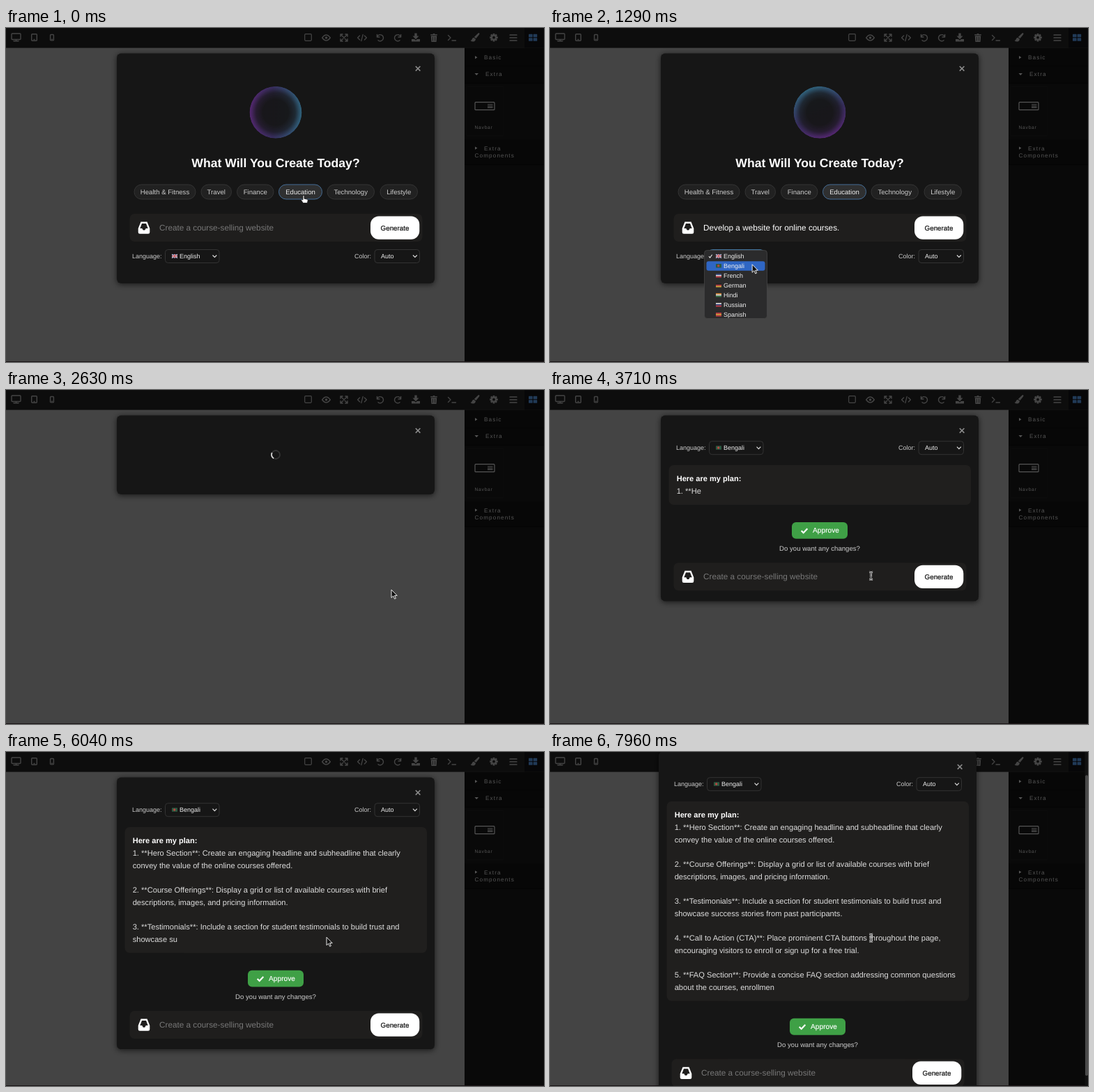
These frames come from a looping animation (772x480 px, 8000 ms). An HTML page:

```html
<!DOCTYPE html>
<html lang="en">
<head>
<meta charset="utf-8">
<title>Website builder</title>
<style>
html, body { margin: 0; width: 100%; height: 100%; overflow: hidden; background: #444; }
svg { display: block; width: 772px; height: 480px; }
text { font-family: "Liberation Sans", Arial, sans-serif; text-rendering: geometricPrecision; white-space: pre; }
.mono { font-family: "DejaVu Sans Mono", monospace; font-size: 8.2px; letter-spacing: 1.1px; fill: #555; }
.mid { text-anchor: middle; }
.icon { fill: none; stroke: #454545; stroke-width: 1.4; stroke-linecap: round; stroke-linejoin: round; }
.solid { fill: #454545; stroke: none; }
</style>
</head>
<body>
<svg id="stage" viewBox="0 0 772 480" xmlns="http://www.w3.org/2000/svg"></svg>
<script>
const LOOP = 8000, LINE = 17.68;
const T = { prompt: 220, open: 1000, pick: 1550, send: 2330, plan: 3630 };
const PROMPT = 'Develop a website for online courses.';
const PLAN = [
  '1. **Hero Section**: Create an engaging headline and subheadline that clearly',
  'convey the value of the online courses offered.',
  '',
  '2. **Course Offerings**: Display a grid or list of available courses with brief',
  'descriptions, images, and pricing information.',
  '',
  '3. **Testimonials**: Include a section for student testimonials to build trust and',
  'showcase success stories from past participants.',
  '',
  '4. **Call to Action (CTA)**: Place prominent CTA buttons throughout the page,',
  'encouraging visitors to enroll or sign up for a free trial.',
  '',
  '5. **FAQ Section**: Provide a concise FAQ section addressing common questions',
  'about the courses, enrollment, '
];
let sum = 0;
const starts = PLAN.map(s => { const at = sum; sum += s.length + 1; return at; });

const rect = (x, y, w, h, r, fill, more = '') =>
  `<rect x="${x}" y="${y}" width="${w}" height="${h}" rx="${r}" fill="${fill}" ${more}/>`;
const text = (x, y, size, fill, s, more = '') =>
  `<text x="${x}" y="${y}" font-size="${size}" fill="${fill}" ${more}>${s}</text>`;
const at = (x, y, s) => `<g transform="translate(${x} ${y})">${s}</g>`;
const path = (d, more = '') => `<path d="${d}" ${more}/>`;

function toolbar() {
  const solid = 'class="solid"';
  const gear = [0, 45, 90, 135].map(a =>
    `<rect x="-1.4" y="-5.8" width="2.8" height="11.6" class="solid" transform="rotate(${a})"/>`).join('');
  const undo = path('M-4.6-4.5V-1H-1M-4.4-1.4A4.6 4.6 0 1 1-3 3.8');
  return '<g class="icon">' +
    at(14.5, 13, rect(-6.5, -5, 13, 8.5, 1, 'none') + path('M-3.5 5.8H3.5M0 4V5.5')) +
    at(40.5, 13.5, rect(-3.8, -4.8, 7.6, 9.6, 1, 'none') + path('M-.4 3H.4')) +
    at(66, 13.7, rect(-2.4, -4.2, 4.8, 8.4, 1, 'none') + path('M-.3 2.6H.3')) +
    at(433.5, 13.5, rect(-4.8, -4.8, 9.6, 9.6, 1.2, 'none', 'stroke-width="1.2"')) +
    at(459.5, 14, path('M-5.8 0Q0-8 5.8 0Q0 8-5.8 0Z') + `<circle r="1.8" class="solid"/>`) +
    at(485, 14, path('M-4.5-4.5L4.5 4.5M4.5-4.5L-4.5 4.5M-5-1.8V-5H-1.8M1.8-5H5V-1.8M5 1.8V5H1.8M-1.8 5H-5V1.8')) +
    at(511, 14, path('M-3.4-3L-6.4 0L-3.4 3M3.4-3L6.4 0L3.4 3M1.2-4.6L-1.2 4.6', 'stroke-width="1.3"')) +
    at(537, 14, undo) +
    at(562, 14, `<g transform="scale(-1 1)">${undo}</g>`) +
    at(588, 13.5, path('M-1.7-6H1.7V-2H4.6L0 2.7L-4.6-2H-1.7ZM-6 2.5H-2L0 4.3L2 2.5H6V6H-6Z', solid)) +
    at(614, 14, path('M-4.8-5H-1.6L-1-6H1L1.6-5H4.8V-3.6H-4.8ZM-4.2-2.8H4.2L3.6 6H-3.6Z', solid) +
      path('M-1.6-.8V4M1.6-.8V4', 'stroke="#111" stroke-width=".8"')) +
    at(640, 14, path('M-5.5-3.5L-2 0L-5.5 3.5M0 4H5.5', 'stroke-width="1.3"')) +
    at(673, 13.5, path('M6-6.3Q7-5.5 6-4L1.5 1.6L-1.2-.5L4.5-6Q5.3-6.7 6-6.3ZM-1.8.2L1 2.4Q.6 6-3.5 6Q-6 6-6.4 4.2Q-4.6 4.6-4.3 2.6Q-3.8.4-1.8.2Z', solid)) +
    at(700, 13.7, gear + '<circle r="3" stroke-width="2.2" fill="#0d0d0d"/>') +
    at(728, 14, path('M-4.8-4H4.8M-4.8 0H4.8M-4.8 4H4.8', 'stroke-width="1.7"')) +
    '</g>' +
    at(756, 13.8, rect(-12, -13.8, 28, 28.4, 0, '#070708') + [[-6, -5], [.6, -5], [-6, .5], [.6, .5]]
      .map(p => rect(p[0], p[1], 5.6, 4.5, .6, '#213a57')).join(''));
}

function sidebar() {
  const line = (y) => rect(658, y, 114, 1, 0, '#040404');
  return rect(658, 28.6, 114, 451.4, 0, '#090909') +
    rect(658, 28.6, 114, 50.4, 0, '#070707') + line(54) + line(79) +
    rect(661, 84, 53, 71, 1, '#090909', 'stroke="#0c0c0c"') +
    rect(658, 160, 114, 36, 0, '#070707') + line(196) +
    path('M673 40L676.4 42.2L673 44.4ZM672.5 65L678 65L675.2 68ZM673 170.4L676.4 172.6L673 174.8Z', 'fill="#555"') +
    '<g class="mono">' +
    '<text x="686" y="45">Basic</text><text x="688" y="69.2">Extra</text>' +
    '<text x="686" y="175.6">Extra</text><text x="672.5" y="185.6">Components</text>' +
    '<text x="672.5" y="145.4" style="font-size:6.7px;letter-spacing:.75px">Navbar</text></g>' +
    rect(673, 106.7, 28, 11, 1, 'none', 'stroke="#555" stroke-width="1.2"') +
    path('M691 110H698.5M691 112.2H698.5M691 114.4H698.5', 'stroke="#555" stroke-width="1.1"');
}

const flagUK = rect(0, 0, 8, 5.4, .5, '#34457f') +
  path('M0 0L8 5.4M8 0L0 5.4', 'stroke="#d8cfd2" stroke-width="1.1"') +
  path('M4 0V5.4M0 2.7H8', 'stroke="#e4dcdc" stroke-width="1.9"') +
  path('M4 0V5.4M0 2.7H8', 'stroke="#c23a44" stroke-width="1.1"');
const flagBD = rect(0, 0, 8, 5.4, .5, '#2c5a41') + '<circle cx="3.7" cy="2.7" r="1.7" fill="#b8453f"/>';
const stripes = (a, b, c) => rect(0, 0, 8, 1.8, 0, a) + rect(0, 1.8, 8, 1.8, 0, b) + rect(0, 3.6, 8, 1.8, 0, c);

function select(x, w, id) {
  return rect(x, -9.5, w, 19, 4, '#161616', `id="${id}" stroke="#333"`) +
    path(`M${x + w - 9.5}-1.5l2.9 3l2.9-3`, 'fill="none" stroke="#ddd" stroke-width="1.2"');
}

function options() {
  return '<g id="options">' + text(181, 3.2, 9, '#ccc', 'Language:') + select(228.5, 77.5, 'langBox') +
    `<g id="en">${at(238, -2.9, flagUK)}${text(249, 3.2, 9, '#eee', 'English')}</g>` +
    `<g id="bn">${at(238, -2.9, flagBD)}${text(249, 3.2, 9, '#eee', 'Bengali')}</g>` +
    text(500, 3.2, 9, '#ccc', 'Color:') + select(529, 64.5, 'colorBox') + text(538, 3.2, 9, '#eee', 'Auto') + '</g>';
}

function inputBar() {
  return '<g id="bar">' + rect(177.5, -20, 420, 40, 7, '#1f1e1d', 'id="barBox"') +
    path('M193.5-8.5H202.5L206.3 1V6.5Q206.3 8.8 204 8.8H192Q189.7 8.8 189.7 6.5V1ZM195-6L192.3 1H195.3L196.7 3.6H199.3L200.7 1H203.7L201-6Z',
      'fill="#fff" fill-rule="evenodd"') +
    text(220, 4.1, 11.75, '#777', '', 'id="prompt"') +
    '<g id="button">' + rect(523, -16.6, 70.3, 33.4, 12, '#fff') +
    text(558, 3.5, 9.8, '#111', 'Generate', 'class="mid" stroke="#111" stroke-width=".2"') + '</g></g>';
}

function chips() {
  return [['Health &amp; Fitness', 184, 88], ['Travel', 280, 43.5], ['Finance', 331.5, 52.5],
    ['Education', 391.5, 62], ['Technology', 461, 67.5], ['Lifestyle', 537, 53.5]]
    .map(([name, x, w], i) => rect(x, 225, w, 21, 10.5, i == 3 ? '#2f3031' : '#212121',
      `stroke="${i == 3 ? '#456d96' : '#343434'}"`) +
      text(x + w / 2, 239, 9.6, i == 3 ? '#eee' : '#ccc', name, 'class="mid"')).join('');
}

function popup() {
  const items = [['English', flagUK], ['Bengali', flagBD], ['French', stripes('#34457f', '#ddd', '#c23a44')],
    ['German', stripes('#222', '#c23a44', '#d6ab3c')], ['Hindi', stripes('#d58a3c', '#ddd', '#3a7a4a')],
    ['Russian', stripes('#ddd', '#34457f', '#c23a44')], ['Spanish', stripes('#c23a44', '#d6ab3c', '#c23a44')]];
  return '<g id="popup">' + rect(221.5, 319.5, 90, 98, 4, '#2b2b2c', 'stroke="#4a4a4a" stroke-width=".7"') +
    rect(224.5, 0, 84, 13.5, 3, '#2f66c4', 'id="hover"') +
    path('M228 328.2l1.6 2l3-4.4', 'fill="none" stroke="#eee" stroke-width="1.1"') +
    items.map(([name, flag], i) => at(0, 328 + 14 * i, at(238, -2.9, flag) + text(249, 3.2, 9, '#eee', name))).join('') + '</g>';
}

const body = PLAN.map((s, i) => text(181.7, 148.9 + LINE * i, 11.12, '#ddd', '', `id="line${i}"`)).join('');
const stage = document.getElementById('stage');
stage.innerHTML = `<defs>
  <filter id="shadow" x="-10%" y="-20%" width="120%" height="140%">
    <feDropShadow dx="0" dy="1.5" stdDeviation="4" flood-color="#000" flood-opacity=".65"/></filter>
  <linearGradient id="hue"><stop offset="0" stop-color="#6f2f98"/><stop offset=".45" stop-color="#47397f"/>
    <stop offset="1" stop-color="#3b84a8"/></linearGradient>
  <radialGradient id="rim"><stop offset=".5" stop-color="#fff" stop-opacity=".05"/>
    <stop offset=".75" stop-color="#fff" stop-opacity=".22"/><stop offset=".92" stop-color="#fff" stop-opacity=".6"/>
    <stop offset="1" stop-color="#fff" stop-opacity=".72"/></radialGradient>
  <mask id="glow"><circle r="37.5" fill="url(#rim)"/></mask></defs>` +
  rect(0, 0, 772, 480, 0, '#444') + rect(0, 0, 772, 28.6, 0, '#0d0d0d') + toolbar() + sidebar() +
  rect(0, 479, 772, 1, 0, '#1b1416') +
  '<g id="dialog">' + rect(159, 36.5, 456, 330, 6, '#191919', 'id="modal" filter="url(#shadow)"') +
  path('M587.8 55L594.4 61.6M594.4 55L587.8 61.6', 'stroke="#8c8c8c" stroke-width="1.6"') +
  '<g id="home">' + at(387, 121.3, '<g id="orb"><circle r="37.5" fill="url(#hue)" mask="url(#glow)"/></g>') +
  text(387, 200.3, 17.6, '#fff', 'What Will You Create Today?', 'class="mid" font-weight="700"') + chips() + '</g>' +
  '<g id="spinner"><circle r="6" fill="none" stroke="#333" stroke-width="1.8"/>' +
  path('M0-6A6 6 0 0 1 6 0', 'fill="none" stroke="#ddd" stroke-width="1.8"') + '</g>' +
  '<g id="plan">' + rect(170.5, 108, 433.5, 57, 7, '#201f1e', 'id="panel"') +
  text(181.7, 131.3, 11.05, '#fff', 'Here are my plan:', 'font-weight="700"') + body +
  '<g id="foot">' + rect(347, 190, 80, 23.8, 6, '#3fa046') +
  path('M360.7 202.2l3 3l5.6-6', 'fill="none" stroke="#fff" stroke-width="2.2"') +
  text(377, 205.4, 10.2, '#fff', 'Approve', 'stroke="#fff" stroke-width=".15"') +
  text(387, 231.2, 9.62, '#ccc', 'Do you want any changes?', 'class="mid"') + '</g></g>' +
  inputBar() + options() + '</g>' + popup() +
  '<g id="scroll">' + rect(767.5, 0, 4.5, 480, 0, '#111') + rect(768, 0, 4, 440, 2, '#4a4a4a', 'id="thumb"') + '</g>' +
  '<g id="cursor">' +
  path('M0 0V11.5L2.7 9L4.6 13.2L6.4 12.4L4.6 8.4H8.2Z', 'id="arrow" fill="#111" stroke="#fff" stroke-width=".9"') +
  path('M-1 0Q0-1.6 1 0V4.2L5.4 5.2Q6.4 5.6 6.2 7L5.4 10.6H-.6L-3.4 6.6Q-3 5-1 6Z',
    'id="hand" fill="#fff" stroke="#111" stroke-width=".8"') +
  '<g id="beam" fill="none">' + ['#fff" stroke-width="2.4', '#222" stroke-width="1'].map(s =>
    path('M-2.4-5.4Q0-5.4 0-3.8Q0-5.4 2.4-5.4M0-4V4M-2.4 5.4Q0 5.4 0 3.8Q0 5.4 2.4 5.4M-1.3 2H1.3', `stroke="${s}"`)).join('') +
  '</g></g>';

const el = {};
stage.querySelectorAll('[id]').forEach(n => el[n.id] = n);
const show = (id, on) => el[id].style.display = on ? '' : 'none';
const set = (id, name, v) => el[id].setAttribute(name, v);
const move = (id, x, y) => set(id, 'transform', `translate(${x} ${y})`);
const clamp = v => Math.max(0, Math.min(1, v));
const smooth = v => (v = clamp(v), v * v * (3 - 2 * v));

// Interpolates rows of [time, ...values].
function track(rows, t, ease) {
  let i = 0;
  while (i < rows.length - 2 && t >= rows[i + 1][0]) i++;
  const [a, b] = [rows[i], rows[i + 1]];
  const k = ease((t - a[0]) / (b[0] - a[0]));
  return a.slice(1).map((v, j) => v + (b[j + 1] - v) * k);
}
const typed = [[3662, 0], [3710, 7.4], [5170, 220.4], [7000, 491.4], [7960, 633.4], [8000, 639]];
const pointer = [[0, 427, 241], [130, 427, 241], [630, 313, 339], [850, 286, 331], [1050, 284, 329],
  [1400, 292, 343], [1560, 294, 344], [1860, 326, 349], [1960, 326, 349], [2260, 553, 287],
  [2750, 553, 287], [3200, 460, 266.2], [8000, 460, 266.2]];

function render(t) {
  const home = t < T.send, plan = t >= T.plan;
  const count = Math.floor(track(typed, t, clamp)[0]);
  const rows = Math.max(1, starts.filter(s => s < count).length);
  const grow = (rows - 1) * LINE;
  const over = plan && rows > 11;
  const scroll = over ? 37 * smooth((t - 7380) / 260) : 0;

  show('home', home);
  show('spinner', !home && !plan);
  show('plan', plan);
  show('bar', home || plan);
  show('options', home || plan);
  move('dialog', over ? -3 : 0, -scroll);
  set('modal', 'height', home ? 330.5 : plan ? 267 + grow : 113.5);

  set('orb', 'transform', `rotate(${t * .47})`);
  set('spinner', 'transform', `translate(387 93) rotate(${t * .9})`);

  const filled = home && t >= T.prompt;
  el.prompt.textContent = filled ? PROMPT.slice(0, 1 + (t - T.prompt) * .148) : 'Create a course-selling website';
  set('prompt', 'fill', filled ? '#fff' : '#777');
  const wide = filled && t < T.open ? 8.5 : 0;
  move('button', wide, 0);
  set('barBox', 'width', 420 + wide);
  move('bar', 0, plan ? 268.3 + grow : 287);
  move('options', 0, plan ? 83.2 : 328);

  const picked = t >= T.pick, focused = home && t >= T.open;
  show('en', !picked);
  show('bn', picked);
  set('langBox', 'stroke', focused ? '#41759f' : '#333');
  set('langBox', 'fill', focused ? '#1e2022' : '#161616');
  show('popup', t >= T.open && t < T.pick);

  set('panel', 'height', 57 + grow);
  move('foot', 0, grow);
  PLAN.forEach((s, i) => el['line' + i].textContent = s.slice(0, Math.max(0, count - starts[i])));

  show('scroll', over);
  const full = 303.5 + grow;
  set('thumb', 'y', scroll * 480 / full);
  set('thumb', 'height', 480 * 480 / full);

  const [x, y] = track(pointer, t, smooth);
  set('hover', 'y', y < 335 ? 321.3 : 335.3);
  const hand = t < 180 || (home && t > 2210);
  const beam = plan && (rows === 1 || scroll > 28);
  show('hand', hand);
  show('beam', beam);
  show('arrow', !hand && !beam);
  move('cursor', x + (beam ? .7 : 0), y + (beam ? .8 : 0));
}

const begin = performance.now();
function tick() {
  render((performance.now() - begin) % LOOP);
  requestAnimationFrame(tick);
}
tick();
</script>
</body>
</html>
```
